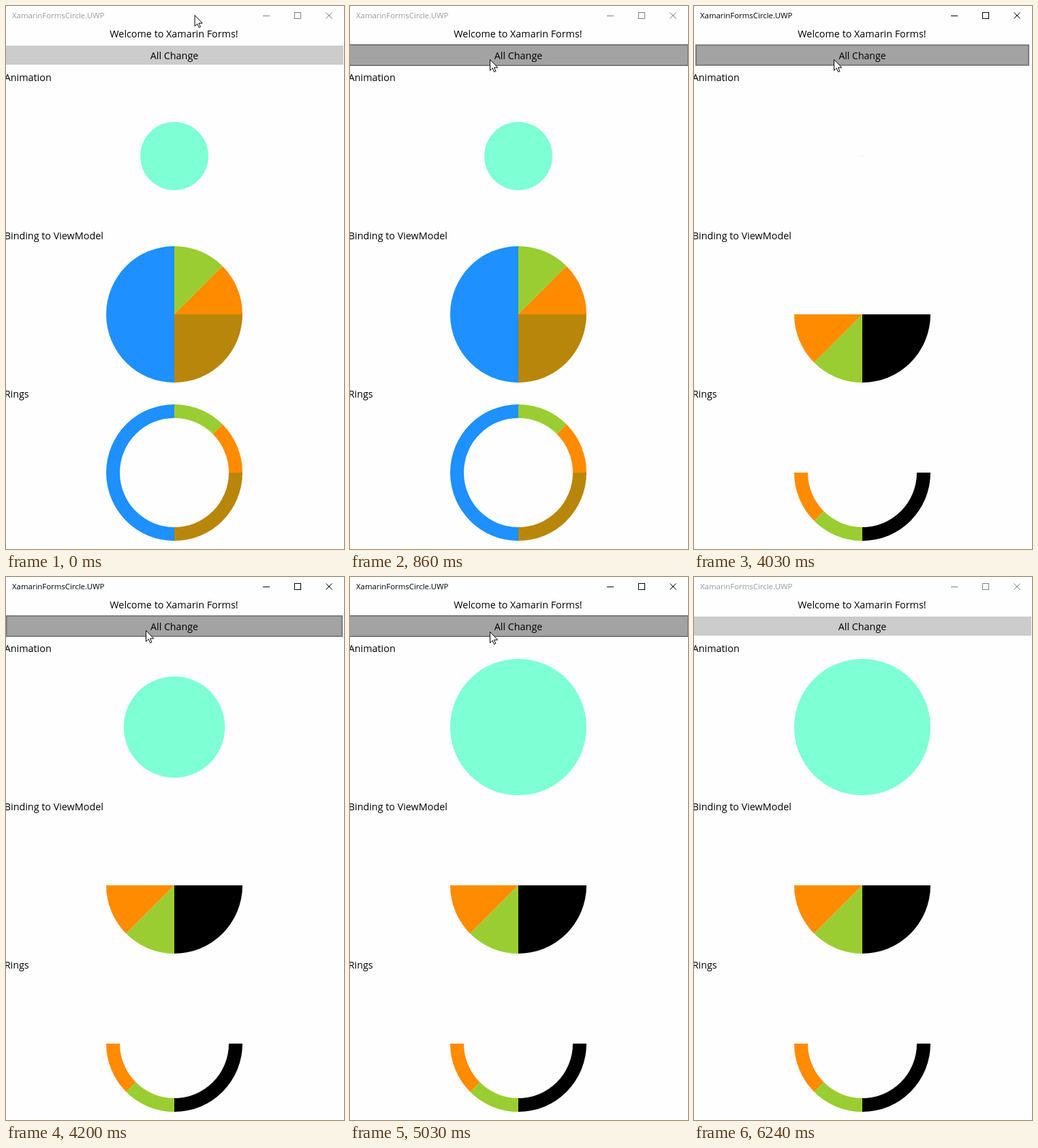
Recreate the animation shown at these times as an HTML page. Size 496 by 796 pixels, loop 6.34 s.

```html
<!DOCTYPE html>
<html lang="en">
<head>
<meta charset="utf-8">
<title>Circles</title>
<style>
html, body { margin: 0; width: 100%; height: 100%; overflow: hidden; background: #fefefe; }
svg { display: block; }
text { font: 14.35px "Open Sans", "Noto Sans", sans-serif; }
.mid { text-anchor: middle; }
#title { font-size: 11.4px; }
#icons { fill: none; shape-rendering: crispEdges; }
#close { shape-rendering: auto; }
</style>
</head>
<body>
<svg width="496" height="796" viewBox="0 0 496 796">
  <text id="title" x="9" y="18">XamarinFormsCircle.UWP</text>
  <g id="icons">
    <path d="M377 14.5h10M423.5 9.5h9v9h-9z"/>
    <path id="close" d="M469.5 9.5l9 9m0-9l-9 9"/>
  </g>
  <text class="mid" x="246.5" y="46">Welcome to Xamarin Forms!</text>
  <g id="button">
    <rect id="face"/>
    <text class="mid" x="247" y="78">All Change</text>
  </g>
  <text x="-2.3" y="110">Animation</text>
  <text x="-2.3" y="342">Binding to ViewModel</text>
  <text x="-2.3" y="574">Rings</text>
  <circle id="disc" cx="247" cy="220" fill="#7fffd4"/>
  <g id="before"></g>
  <g id="after"></g>
  <path id="cursor" d="M.5 .5V16.6L4.2 13.1 6.6 18.6 8.9 17.6 6.5 12.2H11.7Z" fill="#fff" stroke="#000"/>
</svg>
<script>
const LOOP = 6340;
const $ = id => document.getElementById(id);
const set = (el, attrs) => { for (const k in attrs) el.setAttribute(k, attrs[k]); };
const clamp = x => Math.min(1, Math.max(0, x));
const mix = (a, b, p) => a + (b - a) * p;

// Angles run clockwise from the top, in degrees
function sector(cy, inner, from, to) {
  const at = (r, deg) => {
    const a = deg * Math.PI / 180;
    return `${247 + r * Math.sin(a)} ${cy - r * Math.cos(a)}`;
  };
  return `M${at(inner, from)}L${at(100, from)}A100 100 0 0 1 ${at(100, to)}` +
    `L${at(inner, to)}` + (inner ? `A${inner} ${inner} 0 0 0 ${at(inner, from)}Z` : 'Z');
}

function fill(id, parts) {
  $(id).innerHTML = [[452, 0], [684, 80]].map(([cy, inner]) =>
    parts.map(([color, from, to]) =>
      `<path fill="${color}" d="${sector(cy, inner, from, to)}"/>`).join('')).join('');
}

const GREEN = '#9acd32', ORANGE = '#ff8c00';
fill('before', [[GREEN, 0, 45], [ORANGE, 45, 90], ['#b8860b', 90, 180], ['#1e90ff', 180, 360]]);
fill('after', [['#000', 90, 180], [GREEN, 180, 225], [ORANGE, 225, 270]]);

// The pointer jumps once every 35 ms
const jumps = (t, start) => Math.floor((t - start) / 35) + 1;

function pointer(t) {
  if (t < 5030) {
    const p = clamp(jumps(t, 650) / 7);
    return [mix(276.5, 205, p), mix(13, 78, p)];
  }
  const p = clamp((jumps(t, 5030) - 1) / 8);
  return [205, mix(80, 798, p ** 1.5)];
}

function buttonScale(t) {
  if (t < 4000 || t >= 4410) return 1;
  return t < 4030 ? 0.99 : mix(0.98, 1, (t - 4030) / 380);
}

function radius(t) {
  if (t < 4030) return 50;
  return t >= 4410 ? 100 : 100 * (1 - (1 - (t - 4030) / 470) ** 3);
}

function draw(t) {
  const active = t >= 3960 && t < 6240;
  set($('title'), { fill: active ? '#000' : '#999' });
  set($('icons'), { stroke: active ? '#000' : '#808080' });

  const [x, y] = pointer(t);
  set($('cursor'), { transform: `translate(${x} ${y})` });

  const hover = y >= 56 && y < 88;
  set($('face'), hover
    ? { x: -2, y: 57, width: 498, height: 30, fill: '#a3a3a3', stroke: '#7a7a7a', 'stroke-width': 2 }
    : { x: -1, y: 58, width: 496, height: 28, fill: '#ccc', stroke: 'none' });
  set($('button'), { transform: `translate(247 72) scale(${buttonScale(t)}) translate(-247 -72)` });

  set($('disc'), { r: radius(t) });
  const changed = t >= 4030;
  set($('before'), { display: changed ? 'none' : 'inline' });
  set($('after'), { display: changed ? 'inline' : 'none' });
}

const start = performance.now();
function tick() {
  draw((performance.now() - start) % LOOP);
  requestAnimationFrame(tick);
}
tick();
</script>
</body>
</html>
```
